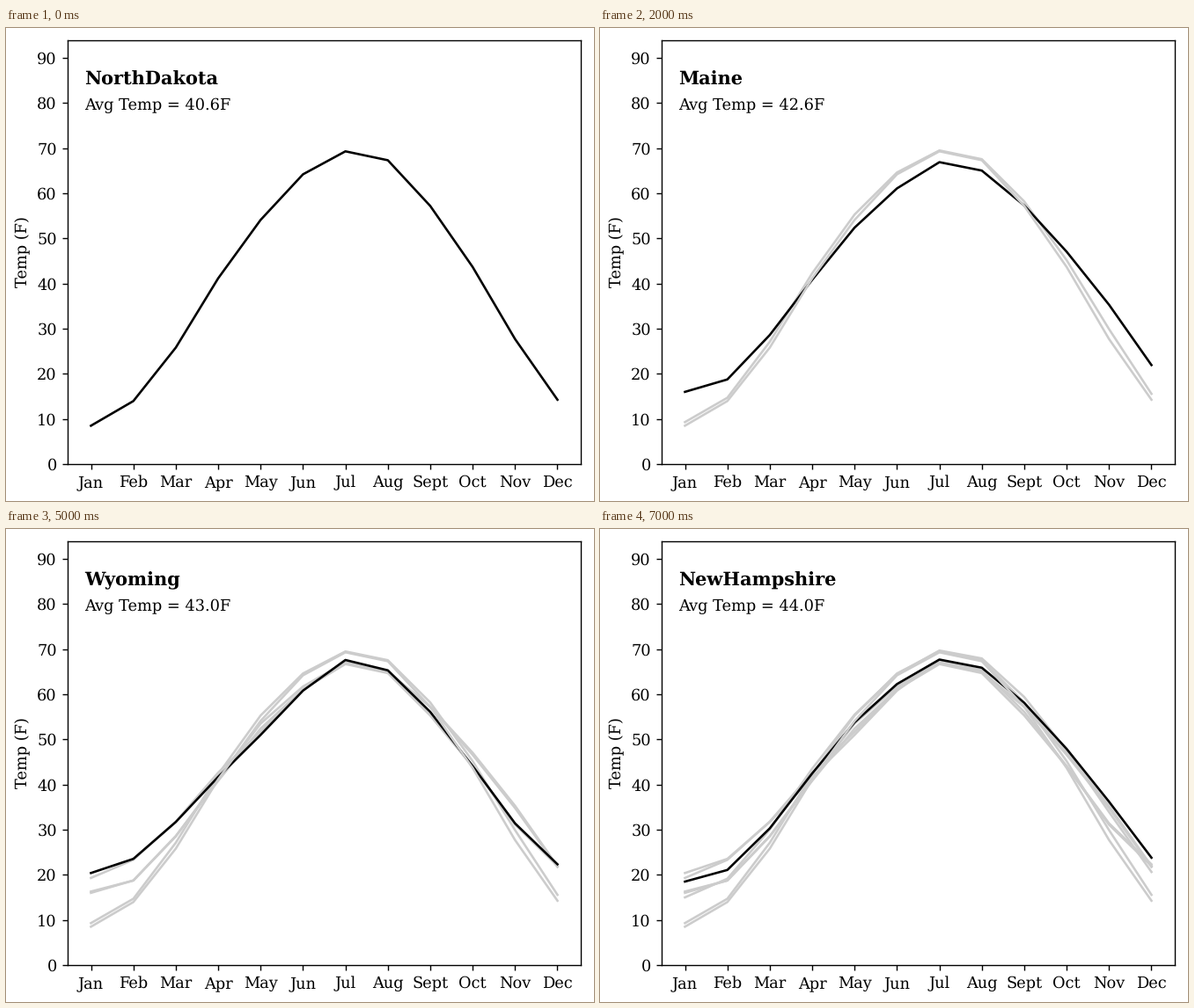
A matplotlib script that plays this animation: 668 px wide and 538 px high, repeating every 8000 ms.

```python
import matplotlib.pyplot as plt
import numpy as np
from matplotlib.animation import FuncAnimation

W, H, DPI = 668, 538, 125
LEFT, RIGHT, TOP, BOTTOM = 70, 653, 14, 496

MONTHS = "Jan Feb Mar Apr May Jun Jul Aug Sept Oct Nov Dec".split()

# State: yearly mean, then key temperatures of every second month from January
STATES = {
    "NorthDakota": (40.6, 8.5, 25.8, 54.1, 69.3, 57.2, 27.7),
    "Minnesota": (41.6, 9.3, 27.1, 55.3, 69.5, 58.2, 29.9),
    "Maine": (42.6, 16.0, 28.6, 52.4, 66.9, 57.3, 35.3),
    "Vermont": (42.7, 16.3, 28.5, 53.5, 67.1, 57.2, 34.8),
    "Montana": (42.8, 19.3, 31.8, 51.7, 66.7, 55.3, 31.1),
    "Wyoming": (43.0, 20.4, 31.7, 51.0, 67.6, 56.1, 31.4),
    "Wisconsin": (43.9, 15.0, 30.0, 55.5, 69.7, 59.4, 33.9),
    "NewHampshire": (44.0, 18.5, 30.3, 53.8, 67.7, 58.1, 36.2),
}
NAMES = list(STATES)

# How the months between depart from a smooth year, alike in all states
WIGGLE = np.array([-0.5, 0.8, -0.3, 1.0, 0.5, -1.2])


def year(mean, *keys):
    """Twelve monthly values through the key months with the given mean."""
    keys = np.array(keys)
    near = keys + np.roll(keys, -1)
    far = np.roll(keys, 1) + np.roll(keys, -2)
    between = (9 * near - far) / 16 + WIGGLE
    between += (12 * mean - keys.sum() - between.sum()) / 6
    return np.column_stack([keys, between]).ravel()


plt.rcParams.update({"font.family": "DejaVu Serif", "font.size": 10.2,
                     "text.hinting": "none"})

fig = plt.figure(figsize=(W / DPI, H / DPI), dpi=DPI, facecolor="white")
ax = fig.add_axes([LEFT / W, 1 - BOTTOM / H,
                   (RIGHT - LEFT) / W, (BOTTOM - TOP) / H])
ax.set_xlim(-0.55, 11.55)
ax.set_ylim(0, 93.9)
ax.set_xticks(range(12), MONTHS)
ax.set_yticks(range(0, 91, 10))
ax.set_ylabel("Temp (F)")

lines = [ax.plot(year(*values), lw=1.5)[0] for values in STATES.values()]
lines[0].set_zorder(4)  # the coldest state stays in front
title = ax.text(-0.15, 84.0, "", fontsize=12, weight="bold")
mean_label = ax.text(-0.15, 78.5, "")


def update(current):
    name = NAMES[current]
    title.set_text(name)
    mean_label.set_text(f"Avg Temp = {STATES[name][0]:.1f}F")
    for i, line in enumerate(lines):
        line.set_visible(i <= current)
        line.set_color("black" if i == current else "0.8")
        if i > 0:
            line.set_zorder(3 if i == current else 2)
    return [*lines, title, mean_label]


anim = FuncAnimation(fig, update, frames=len(NAMES), interval=1000,
                     repeat=True, repeat_delay=0)
plt.show()
```
